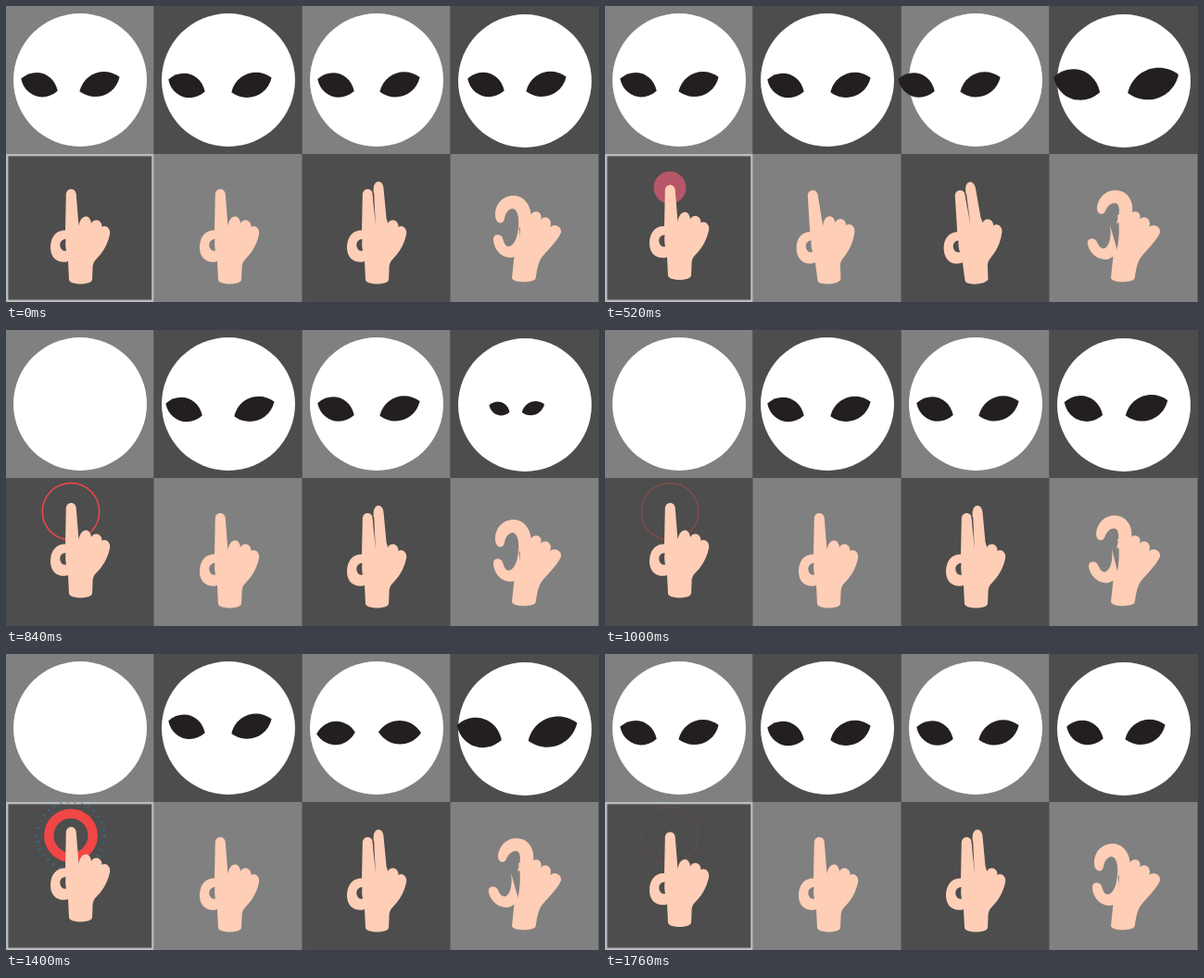
Animation of 640x320 px, one loop 1.8 s. Source, as an HTML page:

```html
<!DOCTYPE html>
<html lang="en">
<head>
<meta charset="utf-8">
<title>Touch gestures</title>
<style>
  html, body { margin: 0; width: 100%; height: 100%; overflow: hidden; background: #4d4d4d; }
  svg { display: block; width: 640px; height: 320px; }
  .light { fill: #808080; }
  .dark { fill: #4d4d4d; }
  .face { fill: #fff; }
  .eyes { fill: #231f20; }
  .skin { fill: #ffceb6; }
</style>
</head>
<body>
<svg viewBox="0 0 640 320">
  <defs>
    <path id="eyeL" d="M-20.8 0C-11-17 11-17 20.8 0C11 17-11 17-20.8 0Z"/>
    <path id="eyeR" d="M-23 0C-12-17 12-17 23 0C12 17-12 17-23 0Z"/>
    <path id="hand" fill-rule="evenodd" d="M64.8 204C65 196 75.6 196 75.8 204L78.5 238C80 225 91 224 92 235C95 229 104 231 103.5 239C107 236 113.5 240 112 247C110 257 105 266 98 273C94 277 93.5 280 93.5 285L93 296C92 302 69 302 68 296L67 276C58 279 48 274 48 261C48 249 55 242 64 242.5ZM64.5 252C60 252 57.5 256 58.5 260C59.3 263.5 62 265.5 65 264.5C64 260 64 256 64.5 252Z"/>
  </defs>

  <path class="light" d="M159.5 160h160v160h-160zM479.5 160h160v160h-160z"/>
  <rect id="frame" x="1.2" y="161.2" width="157.2" height="157.6" fill="none" stroke="#bbb" stroke-width="2.4"/>

  <g id="taps"></g>
  <use id="tapHand" class="skin" href="#hand"/>
  <g id="swipeHand" class="skin"><use href="#hand" x="161"/></g>
  <g id="panHand" class="skin">
    <use href="#hand" x="320"/>
    <path d="M397 240L396.6 199C396.6 187 407 187 407.6 198L411.5 240Z"/>
    <path class="dark" d="M395.6 202H397.2L398.8 237Z"/>
  </g>
  <g class="skin">
    <path d="M552 266C555 252 556 238 553 226L566 226C570 219 580 222 577 231C582 225 591 231 587 239C592 235 600 238 599 245C594 256 584 264 578 272C573 280 573 288 571.5 295C568 299.5 547 299.5 546 294L548.5 270Z"/>
    <path id="index" d="M567 230C567 214 558 205 548 205C536 205 528 214 528 226C528 236 537 237 538 230C539 223 543 219 547 219C552 220 554 228 553 240Z"/>
    <path id="thumb" d="M553 236C553 250 548 260 542 260C538 259 537 254 536 251C534 246 526 246 526 252C526 263 535 273 546 272L557 268Z"/>
  </g>

  <path class="light" d="M0 0h159.5v160H0zM319.5 0h160v160h-160z"/>
  <path class="dark" d="M159.5 0h160v160h-160zM479.5 0H640v160H479.5z"/>
  <g class="face">
    <circle cx="80" cy="80" r="72"/>
    <circle cx="240" cy="80" r="72"/>
    <circle cx="400" cy="80" r="72"/>
    <circle cx="560" cy="81" r="72"/>
  </g>
  <g class="eyes">
    <g id="tapEyes"><use href="#eyeL"/><use href="#eyeR"/></g>
    <g id="swipeEyes"><use href="#eyeL"/><use href="#eyeR"/></g>
    <g id="panEyes"><use href="#eyeL"/><use href="#eyeR"/></g>
    <g id="pinchEyes"><use href="#eyeL"/><use href="#eyeR"/></g>
  </g>
</svg>
<script>
  const LOOP = 1800, STEP = 40, HOLD = 120;
  const TAPS = [280, 1000], TAP_TIME = 800;
  const $ = id => document.getElementById(id);
  const set = (el, attrs) => { for (const k in attrs) el.setAttribute(k, attrs[k]); };
  const move = (id, transform) => set($(id), { transform });
  const mix = (a, b, k) => a + (b - a) * k;

  const part = (t, a, b) => Math.min(1, Math.max(0, (t - a) / (b - a)));
  const ease = (t, a, b) => { const k = part(t, a, b); return k * k * (3 - 2 * k); };
  // One way, then the other, then back to rest.
  const wave = (t, start, span = 720) => Math.sin(2 * Math.PI * part(t, start, start + span));
  // Out and back once.
  const bump = (t, a, b) => Math.sin(Math.PI * part(t, a, b)) ** 2;

  const make = (name, attrs) => {
    const el = document.createElementNS("http://www.w3.org/2000/svg", name);
    set(el, { cx: 70, cy: 196.3, fill: "none", ...attrs });
    return $("taps").appendChild(el);
  };
  const taps = TAPS.map(start => ({
    start,
    ring: make("circle", {}),
    rays: make("circle", {
      r: 36.5, stroke: "#1c83c4", "stroke-width": 3,
      pathLength: 360, "stroke-dasharray": "2 10"
    })
  }));

  // A blue dot grows, reddens, opens into a ring and fades.
  function drawTap({ ring, rays }, p) {
    const on = p > 0 && p < TAP_TIME;
    const outer = 7 * ease(p, -20, 160) + 21 * ease(p, 160, 320) + 3.5 * ease(p, 320, 560);
    const inner = 30 * ease(p, 180, 560);
    const red = ease(p, 160, 280);
    set(ring, {
      r: (outer + inner) / 2,
      "stroke-width": outer - inner,
      stroke: `rgb(${mix(16, 241, red)},${mix(130, 70, red)},${mix(200, 70, red)})`,
      opacity: on ? 1 - ease(p, 560, 820) : 0
    });
    set(rays, { opacity: 0.7 * (ease(p, 320, 380) - ease(p, 440, 540)) });
  }
  const press = p => ease(p, 160, 340) - ease(p, 720, TAP_TIME);

  function placeEyes(id, lx, rx, y, turn = 0) {
    const [left, right] = $(id).children;
    set(left, { transform: `translate(${lx} ${y}) rotate(${18.5 - turn})` });
    set(right, { transform: `translate(${rx} ${y - 0.7}) rotate(${turn - 20})` });
  }

  function draw(t) {
    let lift = 0;
    for (const tap of taps) {
      drawTap(tap, t - tap.start);
      lift += press(t - tap.start);
    }
    move("tapHand", `translate(0 ${-11 * lift})`);
    set($("frame"), { opacity: t < 600 || t >= 1320 ? 1 : 0 });
    set($("tapEyes"), { opacity: t < 600 || t >= 1440 ? 1 : 0 });

    const side = wave(t, 120), up = wave(t, 1040);
    const tilt = 13.3 * side - 1.2 * side * side;
    const follow = bump(t, 1000, 1480) - 0.5 * bump(t, 1480, 1760);
    move("swipeHand", `translate(0 ${-23 * up}) rotate(${tilt} 242 290)`);
    move("panHand", `translate(0 ${-10.4 * up}) rotate(${tilt} 402 290)`);

    const near = 8.5 * wave(t, 160), slide = 21.5 * wave(t, 120, 580);
    placeEyes("swipeEyes", 195 + near, 265 - near, 86 - 29 * follow);
    placeEyes("panEyes", 356 + slide, 425 + slide, 85.5, 85 * follow);

    const open = ease(t, 320, 520) - ease(t, 680, 840) + ease(t, 840, 1080) - ease(t, 1440, 1680);
    const zoom = 1 + 0.27 * ease(t, 320, 530) - 0.71 * ease(t, 530, 840)
               + 0.66 * ease(t, 840, 1080) - 0.22 * ease(t, 1440, 1680);
    move("index", `translate(0 ${-3 * open}) rotate(${15 * open} 560 235)`);
    move("thumb", `translate(${-4 * open} 0) rotate(${-9 * open} 556 262)`);
    move("pinchEyes", `translate(551 85) scale(${zoom}) translate(-551 -85)`);
  }

  placeEyes("tapEyes", 36, 101, 85.2);
  placeEyes("pinchEyes", 518, 583, 85);

  function tick() {
    const t = Math.floor(performance.now() % LOOP / STEP) * STEP;
    draw(t < HOLD ? 0 : t);
    requestAnimationFrame(tick);
  }
  tick();
</script>
</body>
</html>
```
